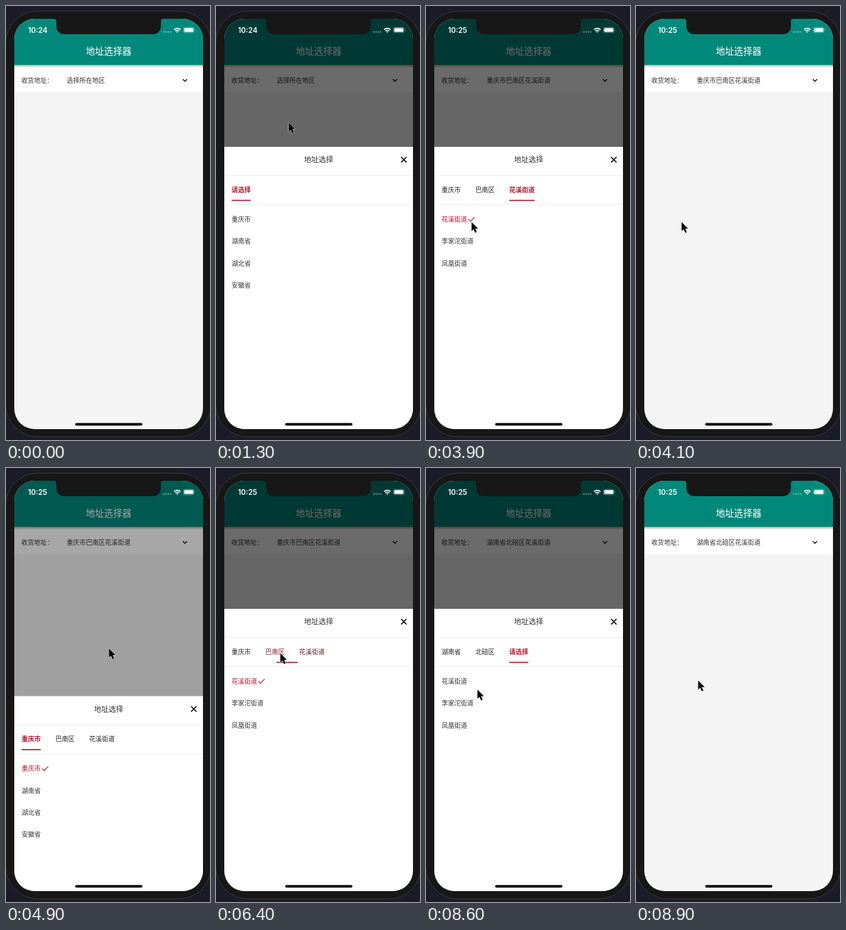
Animation, 320 px wide and 678 px high, one loop 9 s. Source, as an HTML page:

```html
<!DOCTYPE html>
<html lang="zh-CN">
<head>
<meta charset="utf-8">
<title>地址选择器</title>
<style>
html, body { margin: 0; height: 100%; overflow: hidden; background: #1b1c28; }
svg { display: block; width: 100vw; height: 100vh; }
text { font: 10px "Noto Sans CJK SC", "Noto Sans CJK", sans-serif; fill: #333; white-space: pre; }
.line { fill: none; stroke-linecap: round; stroke-linejoin: round; }
#time { font: 600 11.4px Inter, sans-serif; fill: #fff; }
</style>
</head>
<body>
<svg viewBox="0 0 320 678">
  <defs>
    <clipPath id="screen"><rect x="13" y="20" width="296" height="641" rx="32"/></clipPath>
    <linearGradient id="shade" x2="0" y2="1">
      <stop stop-opacity=".3"/><stop offset="1" stop-opacity="0"/>
    </linearGradient>
  </defs>
  <rect x="-.5" y="8" width="322" height="665" rx="50" fill="#171717" stroke="#3b3b3d"/>
  <g clip-path="url(#screen)">
    <rect x="13" y="20" width="296" height="641" fill="#f4f4f4"/>
    <rect x="13" y="92" width="296" height="42.5" fill="#fff"/>
    <rect x="13" y="92" width="296" height="4.5" fill="url(#shade)"/>
    <rect x="13" y="20" width="296" height="72" fill="#00897b"/>
    <text x="161" y="76.4" text-anchor="middle" style="font-size:14.3px;font-weight:500;fill:#fff">地址选择器</text>
    <text x="24" y="120">收货地址：</text>
    <text id="row" x="95.3" y="120"></text>
    <path class="line" d="M277.8 114.8l2.9 2.9 2.9-2.9" stroke="#111" stroke-width="1.5"/>
    <rect id="dim" x="13" y="20" width="296" height="641"/>
    <g id="sheet">
      <rect x="13" width="296" height="445" fill="#fff"/>
      <text x="161" y="24.2" text-anchor="middle" style="font-size:11.4px">地址选择</text>
      <path d="M290.4 15.9l8.4 8.4m0-8.4l-8.4 8.4" stroke="#111" stroke-width="1.7"/>
      <path d="M13 44.5h296M13 90.5h296" stroke="#ededed"/>
      <g id="tabs"></g>
      <rect id="bar" y="82.8" height="1.7" fill="#b3142d"/>
      <g id="items"></g>
      <path id="check" class="line" d="M0 0l2.8 2.8 6.2-6.2" stroke="#b3142d" stroke-width="1.2"/>
    </g>
    <path d="M75 20q4 0 4 4v8a12 12 0 0 0 12 12h140a12 12 0 0 0 12-12v-8q0-4 4-4z" fill="#171717"/>
    <text id="time" x="34.5" y="41.8"></text>
    <path class="line" d="M247.6 40.6h11" stroke="#fff" stroke-opacity=".4" stroke-width="2.5" stroke-dasharray="0 3.6"/>
    <g class="line" stroke="#fff" stroke-width="1.7" style="stroke-linecap:butt">
      <path d="M263.6 37a7.2 7.2 0 0 1 10.2 0M265.6 39.2a4.4 4.4 0 0 1 6.2 0"/>
      <path d="M268.7 41.8l-1.5-1.5a2.1 2.1 0 0 1 3 0z" fill="#fff" stroke="none"/>
    </g>
    <rect x="278.3" y="33.4" width="16.8" height="8.4" rx="2.4" fill="none" stroke="#fff" stroke-opacity=".45" stroke-width=".8"/>
    <rect x="279.5" y="34.6" width="14.4" height="6" rx="1.4" fill="#fff"/>
    <path d="M296 36.2q1.4 1.4 0 2.8z" fill="#fff" fill-opacity=".5"/>
    <rect x="108.5" y="651.6" width="105.5" height="3.8" rx="1.9"/>
  </g>
  <path id="cursor" d="M0 0v14.2l3.2-3 2.5 5.6 2.5-1.1-2.4-5.4h4.4z" stroke="#fff" stroke-width="1" paint-order="stroke"/>
</svg>
<script>
const LOOP = 9000, TAB_MS = 250, TOP = 220, BOTTOM = 661;
const $ = id => document.getElementById(id);
const full = ["重庆市", "巴南区", "花溪街道"], full2 = ["湖南省", "北碚区", "花溪街道"];
const ask = "请选择";
const lists = [
  ["重庆市", "湖南省", "湖北省", "安徽省"],
  ["巴南区", "北碚区", "渝中区", "南岸区"],
  ["花溪街道", "李家沱街道", "凤凰街道"]
];

// time, tab labels, active tab, chosen address
const steps = [
  [0, [ask], 0, "选择所在地区"],
  [2300, [full[0], ask], 1, "重庆市"],
  [3300, [full[0], full[1], ask], 2, "重庆市巴南区"],
  [3850, full, 2, full.join("")],
  [4300, full, 0, full.join("")],
  [5560, full, 2, full.join("")],
  [6247, full, 1, full.join("")],
  [6850, full, 0, full.join("")],
  [7400, [full2[0], ask], 1, "湖南省巴南区花溪街道"],
  [8010, [full2[0], full2[1], ask], 2, full2.join("")],
  [8700, full2, 2, full2.join("")]
];

// opening start, opening end, closing start, closing end
const visits = [[902, 1005, 3970, 4098], [4796, 4948, 8760, 8888]];

// time, x, y of the pointer tip
const path = [
  [200, 148, 141], [400, 132, 88], [600, 140, 112], [1000, 140, 112],
  [1800, 58, 332], [2100, 51.5, 336.5], [3350, 51.5, 336.5], [3800, 71.5, 337.5],
  [4100, 71.5, 337.5], [4400, 140, 116], [4600, 140, 116], [4780, 152, 160],
  [4900, 161.5, 282], [5400, 150, 290], [5950, 150, 290], [6240, 101, 289.5],
  [6550, 101, 289.5], [6800, 44, 289], [6950, 44, 289], [7250, 74.5, 351.5],
  [8550, 74.5, 351.5], [8700, 97.5, 332]
];

const ramp = (t, a, b) => Math.min(1, Math.max(0, (t - a) / (b - a)));
const smooth = u => u * u * (3 - 2 * u);
const mix = (a, b, u) => a + (b - a) * u;
const ink = u => `rgb(${mix(34, 179, u)},${mix(34, 20, u)},${mix(34, 45, u)})`;

function addTexts(group, count) {
  return Array.from({ length: count }, () => {
    const el = document.createElementNS("http://www.w3.org/2000/svg", "text");
    return $(group).appendChild(el);
  });
}
const tabEls = addTexts("tabs", 3), itemEls = addTexts("items", 4);
tabEls.forEach((el, i) => { el.setAttribute("x", 24.5 + i * 53); el.setAttribute("y", 70.6); });
itemEls.forEach((el, i) => { el.setAttribute("x", 24.5); el.setAttribute("y", 117 + i * 34.3); });

function drawSheet(t) {
  const n = steps.findLastIndex(s => s[0] <= t);
  const [start, tabs, to, address] = steps[n];
  const from = n ? steps[n - 1][2] : to;
  const u = from === to ? 1 : smooth(ramp(t, start, start + TAB_MS));
  $("row").textContent = address;

  tabEls.forEach((el, i) => {
    const on = i === to ? u : i === from ? 1 - u : 0;
    el.textContent = tabs[i] || "";
    el.style.fill = ink(on);
    el.style.fontWeight = on > .8 ? 700 : 500;
  });
  const width = i => tabs[i].length * 10;
  $("bar").setAttribute("x", 24.5 + mix(from, to, u) * 53);
  $("bar").setAttribute("width", mix(width(from), width(to), u));

  const level = u < 1 ? from : to, list = lists[level], picked = list.indexOf(tabs[level]);
  itemEls.forEach((el, i) => {
    el.textContent = list[i] || "";
    el.style.fill = i === picked ? ink(1) : "#333";
  });
  $("check").style.display = picked < 0 ? "none" : "";
  if (picked >= 0) {
    const x = 57 + (list[picked].length - 3) * 10;
    $("check").setAttribute("transform", `translate(${x} ${113.6 + picked * 34.3})`);
  }

  const open = Math.max(...visits.map(v => ramp(t, v[0], v[1]) - ramp(t, v[2], v[3])));
  $("sheet").setAttribute("transform", `translate(0 ${mix(BOTTOM, TOP, open)})`);
  $("dim").setAttribute("opacity", .58 * open ** 1.4);
}

function drawCursor(t) {
  const n = path.findLastIndex(p => p[0] <= t);
  $("cursor").style.display = n < 0 ? "none" : "";
  if (n < 0) return;
  const a = path[n], b = path[n + 1] || a;
  const u = a === b ? 0 : smooth(ramp(t, a[0], b[0]));
  $("cursor").setAttribute("transform", `translate(${mix(a[1], b[1], u)} ${mix(a[2], b[2], u)})`);
}

function frame(now) {
  const t = now % LOOP;
  $("time").textContent = t < 3500 ? "10:24" : "10:25";
  drawSheet(t);
  drawCursor(t);
  requestAnimationFrame(frame);
}
frame(0);
</script>
</body>
</html>
```
